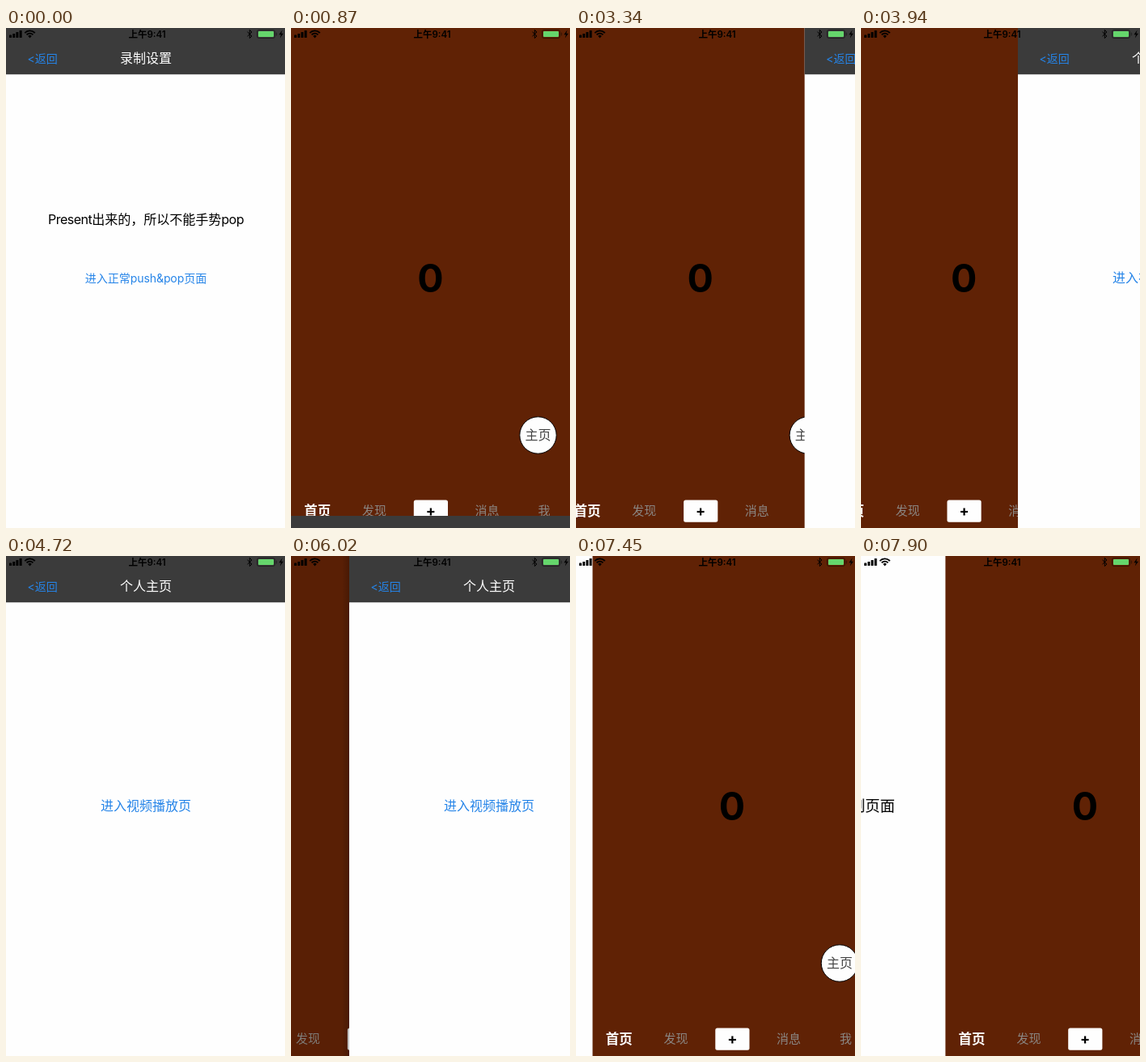
These frames come from a looping animation (345x617 px, 7990 ms). An HTML page with a canvas:

```html
<!DOCTYPE html>
<html lang="zh-CN">
<head>
<meta charset="utf-8">
<style>
  html, body { margin: 0; width: 100%; height: 100%; overflow: hidden; background: #fefefe; }
  canvas { display: block; width: 345px; height: 617px; }
</style>
</head>
<body>
<canvas id="stage"></canvas>
<script>
const W = 345, H = 617, LOOP = 7990, STEP = 85.6;
const FONT = 'Inter, "Noto Sans CJK SC", "Noto Sans CJK", sans-serif';
const BROWN = '#602205', PAPER = '#fefefe', BAR = '#3b3b3b', BLUE = '#2584e8', GRAY = '#8a8683';

const canvas = document.getElementById('stage');
const ctx = canvas.getContext('2d');
const dpr = window.devicePixelRatio || 1;
canvas.width = W * dpr;
canvas.height = H * dpr;

function rect(x, y, w, h, color, r = 0) {
  ctx.fillStyle = color;
  ctx.beginPath();
  ctx.roundRect(x, y, w, h, r);
  ctx.fill();
}

function line(points, width, color = '#000') {
  ctx.strokeStyle = color;
  ctx.lineWidth = width;
  ctx.beginPath();
  points.forEach(([x, y]) => ctx.lineTo(x, y));
  ctx.stroke();
}

function text(str, x, y, size, color, weight = 400, align = 'center') {
  ctx.font = `${weight} ${size}px ${FONT}`;
  ctx.textAlign = align;
  ctx.fillStyle = color;
  ctx.fillText(str, x, y);
}

// Centred Chinese and Latin runs; only the Latin letters are tracked
function mixedText(str, x, y, size, color, tracking) {
  ctx.font = `400 ${size}px ${FONT}`;
  ctx.textAlign = 'left';
  ctx.fillStyle = color;
  const runs = str.split(/([ -~]+)/).filter(Boolean).map(run => {
    const spacing = /[a-z]/.test(run) ? `${tracking}px` : '0px';
    ctx.letterSpacing = spacing;
    return { run, spacing, width: ctx.measureText(run).width };
  });
  x -= runs.reduce((sum, r) => sum + r.width, 0) / 2;
  for (const { run, spacing, width } of runs) {
    ctx.letterSpacing = spacing;
    ctx.fillText(run, x, y);
    x += width;
  }
  ctx.letterSpacing = '0px';
}

function at(x, y, draw) {
  ctx.save();
  ctx.translate(x, y);
  draw();
  ctx.restore();
}

function statusBar() {
  [3.5, 5, 7, 9].forEach((h, i) => rect(4 + i * 4.2, 12 - h, 3, h, '#000', 0.6));

  // Wi-Fi
  ctx.strokeStyle = '#000';
  ctx.lineWidth = 1.8;
  for (const r of [8.6, 5.4]) {
    ctx.beginPath();
    ctx.arc(29.5, 12, r, -Math.PI * 0.76, -Math.PI * 0.24);
    ctx.stroke();
  }
  ctx.fillStyle = '#000';
  ctx.beginPath();
  ctx.moveTo(29.5, 12.6);
  ctx.arc(29.5, 12, 3, -Math.PI * 0.76, -Math.PI * 0.24);
  ctx.fill();

  text('上午9:41', 174.5, 11.5, 11.5, '#000', 600);

  // Bluetooth
  line([[298.5, 4.8], [304, 10], [301.3, 12.6], [301.3, 2.4], [304, 5], [298.5, 10.2]], 1);

  // Battery
  ctx.strokeStyle = 'rgba(0,0,0,.45)';
  ctx.lineWidth = 1;
  ctx.beginPath();
  ctx.roundRect(310.5, 2.5, 22, 10, 2.2);
  ctx.stroke();
  rect(312, 4, 19, 7, '#65d66c', 1);
  rect(333.8, 5.5, 1.3, 4, 'rgba(0,0,0,.4)', 0.6);

  // Charging bolt
  ctx.fillStyle = '#000';
  ctx.beginPath();
  [[341.6, 2.5], [337.5, 8.2], [340, 8.2], [338.8, 12.6], [343, 6.8], [340.4, 6.8]]
    .forEach(([x, y]) => ctx.lineTo(x, y));
  ctx.fill();
}

function navPage(title) {
  rect(0, 0, W, H, PAPER);
  rect(0, 0, W, 57.2, BAR);
  text('<返回', 26.5, 42.5, 14, BLUE, 400, 'left');
  text(title, 173, 42.8, 16, '#fff');
}

function settings() {
  navPage('录制设置');
  mixedText('Present出来的，所以不能手势pop', 173, 242, 16, '#000', -0.5);
  mixedText('进入正常push&pop页面', 173, 314, 14, BLUE, -0.1);
}

function profile() {
  navPage('个人主页');
  text('进入视频播放页', 173, 314.3, 16, BLUE);
}

function recorder() {
  rect(0, 0, W, H, PAPER);
  text('录制页面', 283, 314.8, 18.5, '#000', 400, 'right');
}

function home() {
  rect(0, 0, W, H, BROWN);
  text('0', 172.5, 326, 48, '#000', 700);

  ctx.beginPath();
  ctx.arc(305.5, 502.5, 22.7, 0, Math.PI * 2);
  ctx.fillStyle = '#fefefe';
  ctx.fill();
  ctx.strokeStyle = '#000';
  ctx.lineWidth = 1;
  ctx.stroke();
  text('主页', 305.5, 508.3, 16, '#444');

  text('首页', 32.7, 602, 16.5, '#fff', 600);
  text('发现', 103, 601.2, 15, GRAY, 500);
  rect(151.8, 582.6, 42.2, 27.2, '#fefefe', 2.5);
  text('+', 172.8, 602.3, 18, '#000', 700);
  text('消息', 242.5, 601.2, 15, GRAY, 500);
  text('我', 313, 601.2, 15, GRAY, 500);
}

// Profile page at x, with the home page trailing behind it
function stack(x, shaded) {
  at(-0.3 * (W - x), 0, home);
  if (shaded) {
    rect(0, 0, x, H, `rgba(0,0,0,${0.1 * (1 - x / W)})`);
    const shadow = ctx.createLinearGradient(x - 9, 0, x, 0);
    shadow.addColorStop(0, 'rgba(0,0,0,0)');
    shadow.addColorStop(1, `rgba(0,0,0,${0.24 * (1 - x / W)})`);
    rect(x - 9, 0, 9, H, shadow);
  }
  at(x, 0, profile);
}

function along(keys, k) {
  const i = keys.findIndex(([step]) => step >= k);
  if (i < 1) return keys[i < 0 ? keys.length - 1 : 0][1];
  const [k0, v0] = keys[i - 1], [k1, v1] = keys[i];
  return v0 + (v1 - v0) * (k - k0) / (k1 - k0);
}

const PUSH = [[0, 345], [6, 308], [15, 194], [19, 128], [20, 104], [21, 50], [22, 17], [23, 4], [24, 0]];
const POP = [[0, 3], [4, 72], [8, 218], [9, 290], [10, 333], [11, 345]];

function dismiss(k) {
  const s = 18 * (0.055 + k * STEP / 1000);
  home();
  at(0, k > 4 ? H : H * (1 - Math.exp(-s) * (1 + s)), settings);
}

function swipeRight(k) {
  const x = 104.4 * Math.pow((k + 1) / 7, 1.3);
  at(x, 0, home);
  at(Math.floor(x) - W, 0, recorder);
}

// start time, last step, drawing for the step
const SCENES = [
  [0, 0, settings],
  [620, 5, dismiss],
  [1130, 0, home],
  [2660, 24, k => stack(along(PUSH, k), false)],
  [5680, 11, k => stack(along(POP, k), true)],
  [6740, 0, home],
  [7360, 6, swipeRight]
];

function render(t) {
  ctx.setTransform(dpr, 0, 0, dpr, 0, 0);
  rect(0, 0, W, H, PAPER);
  const [start, last, draw] = SCENES.findLast(s => s[0] <= t);
  draw(Math.min(last, Math.floor((t - start + 9) / STEP)));
  statusBar();
}

const began = performance.now();
function tick() {
  render((performance.now() - began) % LOOP);
  requestAnimationFrame(tick);
}
tick();
</script>
</body>
</html>
```
